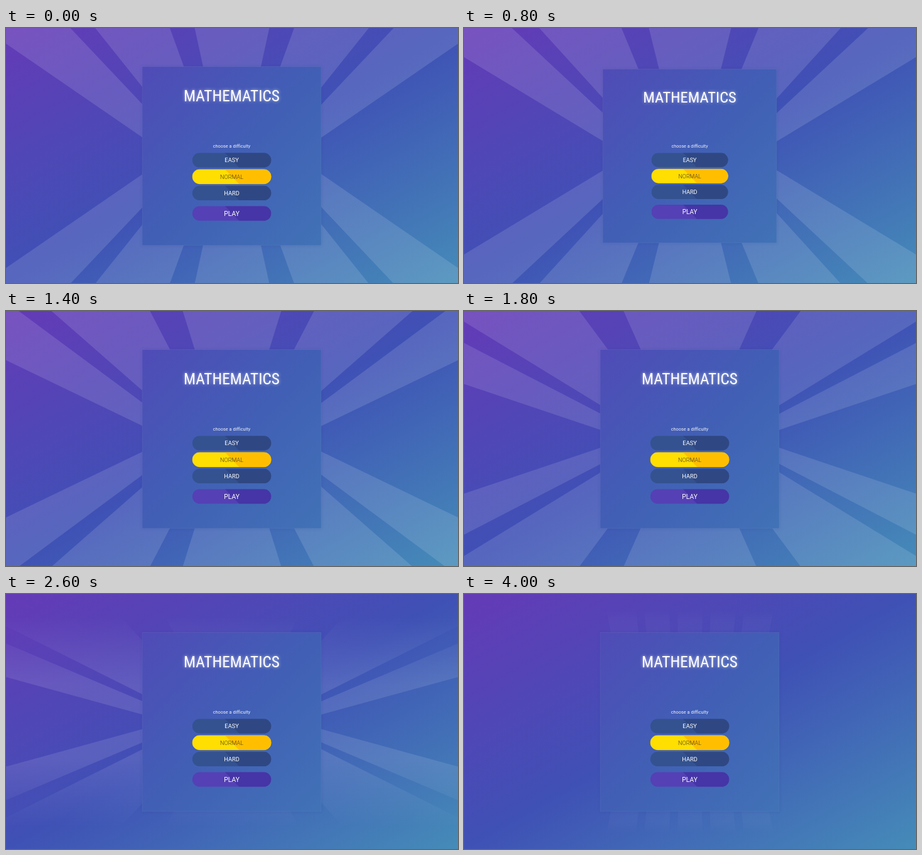
These frames come from a looping animation (720x407 px, 4100 ms). An HTML page:

```html
<!DOCTYPE html>
<html lang="en">
<head>
<meta charset="utf-8">
<title>Mathematics</title>
<style>
html, body { margin: 0; width: 100%; height: 100%; overflow: hidden; background: #3f51b5; }
svg { display: block; width: 100vw; height: 100vh; }
text { font-family: Roboto, sans-serif; text-anchor: middle; fill: #fff; }
#title {
  font-family: "Roboto Condensed", Roboto, sans-serif;
  font-stretch: 75%;
  font-size: 29px;
  filter: drop-shadow(0 0 2.5px rgba(255, 255, 255, .65));
}
</style>
</head>
<body>
<svg viewBox="0 0 720 407" preserveAspectRatio="none">
  <defs>
    <linearGradient id="bg" gradientUnits="userSpaceOnUse" x1="185.6" y1="-106.3" x2="534.4" y2="513.3">
      <stop offset="0" stop-color="#653ab7"/>
      <stop offset=".5" stop-color="#3f51b5"/>
      <stop offset="1" stop-color="#458cb8"/>
    </linearGradient>
    <linearGradient id="panelFill" x1="0" y1="0" x2="1" y2="1">
      <stop offset="0" stop-color="#504bb7"/>
      <stop offset=".5" stop-color="#415fb5"/>
      <stop offset="1" stop-color="#4172b6"/>
    </linearGradient>
    <linearGradient id="rayFill" gradientUnits="userSpaceOnUse" x1="0" x2="0">
      <stop offset="0" stop-color="#fff" stop-opacity="0"/>
      <stop stop-color="#fff"/>
      <stop stop-color="#fff"/>
      <stop offset="1" stop-color="#fff" stop-opacity="0"/>
    </linearGradient>
    <clipPath id="pill"><rect width="125.5" height="23.4" rx="11.7"/></clipPath>
    <filter id="blur" x="-10%" y="-10%" width="120%" height="120%"><feGaussianBlur stdDeviation="2"/></filter>
  </defs>
  <rect width="720" height="407" fill="url(#bg)"/>
  <path id="rays" fill="url(#rayFill)"/>
  <g id="panel">
    <rect x="216.5" y="61.5" width="286" height="286" fill="#273c87" opacity=".22" filter="url(#blur)"/>
    <rect x="217" y="61.5" width="285" height="285.5" fill="url(#panelFill)" stroke="#fff" stroke-opacity=".06"/>
    <text id="title" x="359.5" y="118">MATHEMATICS</text>
    <text x="359.5" y="191" font-size="7.4" fill-opacity=".9">choose a difficulty</text>
    <g id="buttons"></g>
  </g>
</svg>
<script>
const CX = 360, CY = 204, DEPTH = 231, LOOP = 4100;
const $ = id => document.getElementById(id);

const buttons = [
  ["EASY", 199.2, "#34528f", "#2f4884", 9.3, "#fff"],
  ["NORMAL", 225.5, "#ffde02", "#ffbf00", 9.2, "#40381c"],
  ["HARD", 251.7, "#34528f", "#2f4884", 9.3, "#fff"],
  ["PLAY", 284.2, "#5540b5", "#4535a6", 10.3, "#fff"]
];
$("buttons").innerHTML = buttons.map(([label, y, left, right, size, ink]) => {
  const chosen = label === "NORMAL";
  const ring = chosen
    ? '<rect width="125.5" height="23.4" rx="11.7" fill="none" stroke="#8f8a62" stroke-width="1"/>' : "";
  return `<g transform="translate(296.8 ${y})">${ring}
    <g clip-path="url(#pill)"><rect width="126" height="24" fill="${left}"/>
    <path d="M52 0H126V24H75Z" fill="${right}"/></g>
    <text x="62.8" y="${11.8 + size * .355}" font-size="${size}" style="fill:${ink}"
      font-weight="${chosen ? 300 : 400}">${label}</text></g>`;
}).join("");

// Shrink the heading when only a wide face is available
const title = $("title");
const titleSize = Math.min(29, 29 * 153 / title.getComputedTextLength());
title.style.fontSize = titleSize + "px";
title.setAttribute("y", 107.5 + titleSize * .356);

// time, tilt in degrees, opacity, reach, softness of the far end
const keys = [
  [0, 73.4, .125, 400, .3],
  [800, 75.3, .125, 400, .3],
  [1400, 78.2, .125, 400, .3],
  [1800, 81.7, .12, 400, .3],
  [2600, 96.8, .11, 168, .65],
  [3400, 130.6, .04, 180, .12],
  [4000, 157, .025, 178, .1]
];
const stripes = [[-100, -65], [-55, -25], [-15, 15], [25, 55], [65, 100]];

function slope(i, c) {
  const a = keys[Math.max(0, i - 1)], b = keys[Math.min(keys.length - 1, i + 1)];
  return (b[c] - a[c]) / (b[0] - a[0]);
}

function stateAt(t) {
  let i = 0;
  while (i < keys.length - 2 && t >= keys[i + 1][0]) i++;
  const a = keys[i], b = keys[i + 1], span = b[0] - a[0];
  const p = Math.min(1, (t - a[0]) / span), q = 1 - p;
  const tilt = q * q * (1 + 2 * p) * a[1] + p * p * (3 - 2 * p) * b[1]
    + span * p * q * (q * slope(i, 1) - p * slope(i + 1, 1));
  const mix = c => a[c] + (b[c] - a[c]) * p;
  return { tilt, alpha: mix(2), reach: mix(3), soft: mix(4) };
}

function drawRays(t) {
  const { tilt, alpha, reach, soft } = stateAt(t);
  const k = Math.min(1, Math.abs(Math.tan(tilt * Math.PI / 180)) / DEPTH);
  const far = 1 + k * reach;
  const fan = dir => stripes.map(([a, b]) =>
    `M${CX + a} ${CY}L${CX + a * far} ${CY + dir * reach}H${CX + b * far}L${CX + b} ${CY}Z`).join("");
  $("rays").setAttribute("d", fan(-1) + fan(1));
  $("rays").setAttribute("opacity", alpha);
  const fill = $("rayFill"), stops = fill.children;
  fill.setAttribute("y1", CY - reach);
  fill.setAttribute("y2", CY + reach);
  stops[1].setAttribute("offset", soft / 2);
  stops[2].setAttribute("offset", 1 - soft / 2);
}

function drawPanel(t) {
  const p = Math.min(1, Math.max(0, (t - 300) / 1000));
  const s = 1 - .028 * Math.sin(Math.PI * p) ** 2;
  $("panel").setAttribute("transform",
    `translate(359.5 204.3) scale(${s}) translate(-359.5 -204.3)`);
}

function draw(now) {
  let t = Math.floor(now % LOOP / 100) * 100;
  if (t > 3400 && t < 3700) t = 3400;
  drawRays(t);
  drawPanel(t);
}

function tick() {
  draw(performance.now());
  requestAnimationFrame(tick);
}
tick();
</script>
</body>
</html>
```
